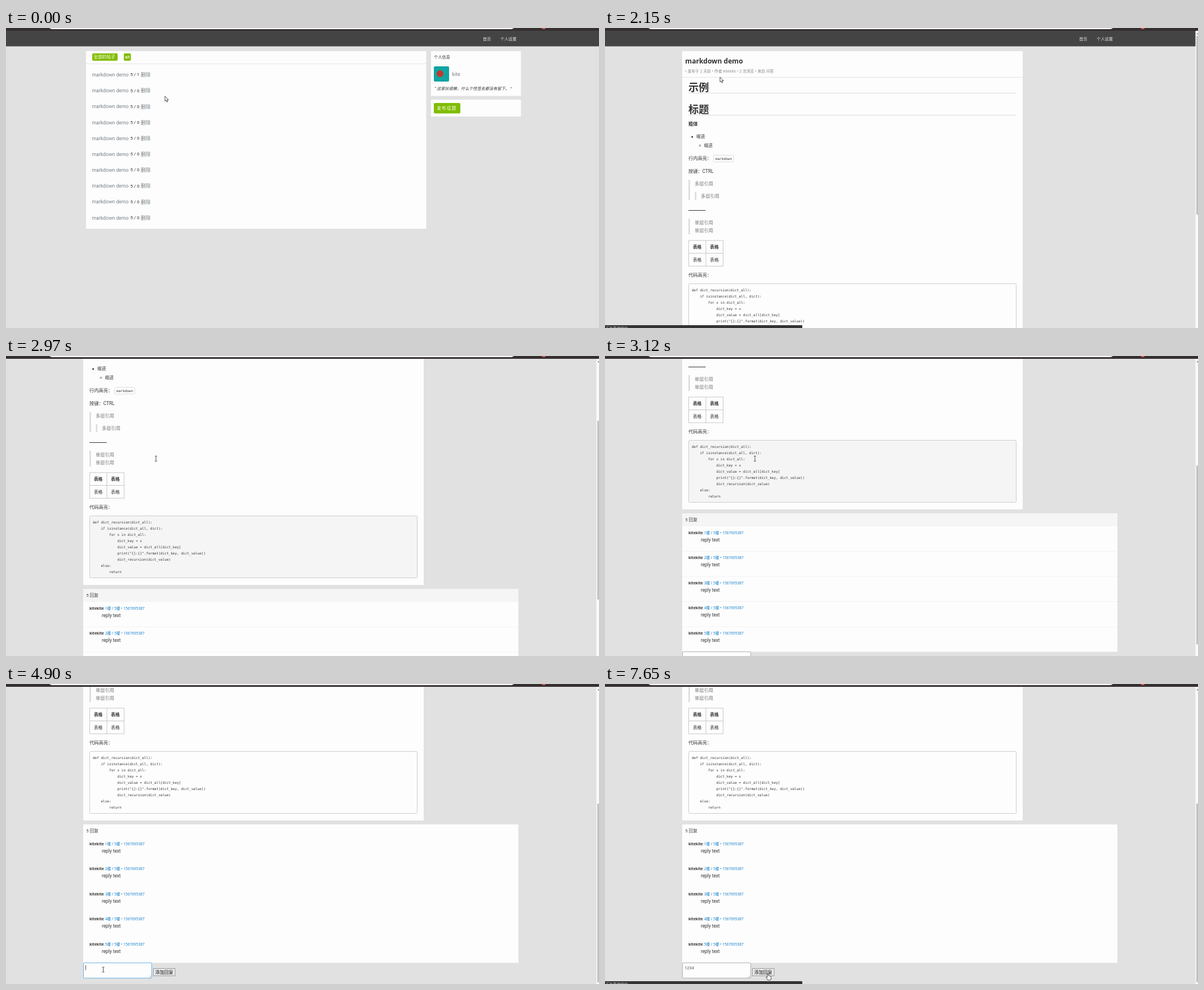
An HTML page that plays this animation: 1052x532 px, repeating every 8000 ms.

```html
<!DOCTYPE html>
<html>
<head>
<meta charset="utf-8">
<style>
html, body { margin: 0; width: 100%; height: 100%; overflow: hidden; background: #e1e1e1; }
svg { display: block; width: 1052px; height: 532px; font-family: Roboto, "Noto Sans CJK SC", "Noto Sans CJK", sans-serif; }
text { white-space: pre; }
.mono { font-family: "DejaVu Sans Mono", monospace; }
.wide { font-family: "Open Sans", "Noto Sans CJK SC", "Noto Sans CJK", sans-serif; }
</style>
</head>
<body>
<svg id="stage" viewBox="0 0 1052 532"></svg>
<script>
const LOOP = 8000;
const MAX_SCROLL = 334;
const PAPER = '#fdfdfd', GREEN = '#80bd01', GREY = '#778087', DARK = '#333', LINE = '#e3e3e3';

const rect = (x, y, w, h, fill, extra = '') =>
  `<rect x="${x}" y="${y}" width="${w}" height="${h}" fill="${fill}" ${extra}/>`;
const frame = (x, y, w, h, stroke, fill = 'none', r = 0) =>
  rect(x, y, w, h, fill, `stroke="${stroke}" rx="${r}"`);
// y is the optical middle of the line
const text = (str, x, y, size, fill = DARK, extra = '') =>
  `<text x="${x}" y="${y + size * .36}" font-size="${size}" fill="${fill}" ${extra}>${str}</text>`;
const group = (id, body) => `<g id="${id}">${body}</g>`;
const repeat = (n, draw) => Array.from({ length: n }, (_, i) => draw(i)).join('');

const BOLD = 'font-weight="700"';
const MEDIUM = 'font-weight="500"';
const WIDE = 'class="wide"';
const MIDDLE = 'text-anchor="middle"';
const MONO = 'class="mono"';

const navBar = shift => rect(0, 5, 1052, 27.5, '#444') +
  text('首页', 846 - shift, 19, 7.15, '#e8e8e8') +
  text('个人设置', 877 - shift, 19, 7.15, '#e8e8e8');

const listRow = i => {
  const y = 83 + 28.17 * i;
  return text('markdown demo', 152.5, y, 8.7, GREY) +
    text(`5 / ${i ? 0 : 1}`, 220.5, y - .5, 8, DARK) +
    text('删除', 239, y, 8.8, GREY);
};

const listPage = navBar(0) +
  rect(142, 41, 603.5, 315, PAPER) + rect(142, 63, 603.5, 1, LINE) +
  rect(153, 45, 45, 13, GREEN, 'rx="2"') + text('全部的帖子', 155.2, 51.5, 7.7, '#fff', MEDIUM) +
  rect(209, 45, 12.5, 13, GREEN, 'rx="2"') + text('all', 211, 51.5, 7.7, '#fff', MEDIUM) +
  repeat(10, listRow) +
  group('underline', rect(152.5, 87, 65.5, .8, GREY)) +
  rect(754, 41, 159.5, 79.5, PAPER) +
  text('个人信息', 759.3, 51.5, 7.15) +
  rect(759, 68, 27, 27, '#11a5a2', 'rx="2"') + '<circle cx="770" cy="81" r="6" fill="#c0392b"/>' +
  text('kite', 791.5, 82, 8.8, GREY) +
  text('“ 这家伙很懒，什么个性签名都没有留下。 ”', 760, 107.5, 7.15, DARK, 'font-style="italic"') +
  rect(754, 127, 159.5, 30, PAPER) +
  rect(759, 133, 47, 18.5, GREEN, 'rx="2"') +
  text('发布话题', 764.3, 142, 7.7, '#fff', `letter-spacing="1.1" ${MEDIUM}`);

const code = `def dict_recursion(dict_all):
    if isinstance(dict_all, dict):
        for x in dict_all:
            dict_key = x
            dict_value = dict_all[dict_key]
            print("{}:{}".format(dict_key, dict_value))
            dict_recursion(dict_value)
    else:
        return`.split('\n');

const heading = (str, y) => text(str, 148, y, 18.2, DARK, BOLD) + rect(148, y + 10, 582, 1, '#ddd');
const quoteBar = (x, y, h) => rect(x, y, 2.8, h, '#ddd');

const article = rect(137, 41, 604, 535, PAPER) +
  text('markdown demo', 142.3, 58.5, 12.1, DARK, `${WIDE} ${BOLD}`) +
  text('• 发布于 2 天前 • 作者 kitekite • 2 次浏览 • 来自 问答', 142.3, 76.3, 6.6, '#838383', `${WIDE} word-spacing=".35"`) +
  rect(137, 87, 604, 1, LINE) +
  heading('示例', 105) + heading('标题', 144) +
  text('粗体', 148, 170, 8.25, DARK, BOLD) +
  '<circle cx="154.6" cy="193" r="1.5" fill="#333"/>' + text('缩进', 162, 192.7, 7.7) +
  '<circle cx="168.4" cy="208.6" r="1.4" fill="none" stroke="#333" stroke-width=".6"/>' + text('缩进', 175.6, 208.5, 7.7) +
  text('行内高亮：', 148, 231, 8.25) + frame(192.5, 225.5, 36, 12, '#ddd', PAPER, 1) +
  text('markdown', 196, 231.8, 6.05, DARK, MONO) +
  text('按键：CTRL', 148, 254.3, 8.25) +
  quoteBar(148, 269, 36) + text('多层引用', 159, 276.3, 8.25, '#777') +
  quoteBar(159.3, 291, 14) + text('多层引用', 170, 298.3, 8.25, '#777') +
  rect(148, 323, 30.5, 1, DARK) +
  quoteBar(148, 338, 28) + text('单层引用', 159, 345.3, 8.25, '#777') + text('单层引用', 159, 358.8, 8.25, '#777') +
  frame(148.5, 376.8, 61, 45.5, '#c8c8c8') + rect(148.5, 399, 61, 1, '#c8c8c8') + rect(178.5, 377, 1, 45.3, '#c8c8c8') +
  [163.6, 194].map(x => text('表格', x, 388.5, 7.7, DARK, `${MIDDLE} ${BOLD}`) + text('表格', x, 411, 7.7, DARK, MIDDLE)).join('') +
  text('代码高亮：', 148, 437.7, 8.25) +
  group('codeShade', rect(148.5, 453.5, 581, 110, '#f5f5f5')) +
  frame(148.5, 453.5, 581, 110, '#ccc', 'none', 2) +
  code.map((line, i) => text(line, 153.9, 464.4 + 11.03 * i, 6.05, DARK, MONO)).join('');

const reply = i => {
  const y = 617.2 + 44.6 * i;
  return text('kitekite', 148, y, 6.6, DARK, `${WIDE} ${BOLD}`) +
    text(`${i + 1}楼 / 5楼 • 1567695387`, 175.7, y, 6.6, '#0a7bc8', WIDE) +
    text('reply text', 170, y + 12.4, 8.25);
};

const replies = rect(137, 583, 772, 245.5, PAPER) +
  group('replyShade', rect(137, 583, 772, 23, '#f5f5f5') + repeat(4, i => rect(137, 650 + 44.6 * i, 772, .8, '#f0f0f0'))) +
  text('5 回复', 142.3, 594.5, 7.7, '#444') + repeat(5, reply);

const form = `<rect id="field" x="137.5" y="828.5" width="121" height="27" rx="1.5" fill="${PAPER}"/>` +
  '<path d="M253.5 855l4-4M256 855l1.5-1.5" stroke="#888" stroke-width=".6"/>' +
  '<text id="typed" x="141" y="839.7" font-size="7.5" fill="#555"></text>' +
  rect(0, 832.5, .8, 9, DARK, 'id="caret"') +
  frame(261.5, 838.5, 38.5, 13, '#999', '#e9e9e9') +
  text('添加回复', 264.8, 845.2, 8, '#111', MEDIUM);

const scrollBar = rect(1047.5, 5, 4.5, 527, '#fafafa') +
  '<path d="M1049.6 11l1.4-2 1.4 2z" fill="#555"/>' + rect(1049, 14, 3, 317, '#c1c1c1', 'id="thumb"');

const browserEdge = rect(0, 0, 1052, 5, '#352f30') +
  '<path d="M77 0H901Q899 2 896 2H82Q79 2 77 0Z" fill="#fff"/>' + rect(951, 0, 6, 2, '#d9534f');

const cursors =
  '<path id="arrow" d="M0 0V8.8L2 7 3.5 10.3 4.9 9.7 3.5 6.5H6.3Z"/>' +
  '<path id="beam" d="M-2-4.5H-.5L0-4 .5-4.5H2M0-4V4M-2 4.5H-.5L0 4 .5 4.5H2" style="fill:none"/>' +
  '<path id="hand" d="M-1 1Q0-.8 1 1V4.5Q2 3.7 2.8 4.9 3.8 4.2 4.4 5.4 5.6 5 5.7 6.5V9L4.7 12H-.2L-3 7.6Q-3.2 6-1.9 6.5L-1 7.5Z"/>';

document.getElementById('stage').innerHTML =
  rect(0, 0, 1052, 532, '#e1e1e1') +
  group('list', listPage) +
  group('topic', group('scroller', navBar(4.7) + article + replies + form) + scrollBar) +
  browserEdge +
  group('status', rect(-2, 527, 10, 8, '#333', 'id="statusBox" rx="1"') +
    '<text id="statusText" x="1" y="535" font-size="6.6" fill="#ccc"></text>') +
  `<g id="pointer" fill="#fff" stroke="#222" stroke-width=".8" stroke-linejoin="round">${cursors}</g>`;

// [time, x, y, shape], each held until the next
const pointerPath = [
  [0, 282, 121, 'arrow'], [650, 267, 122, 'arrow'], [930, 250, 123, 'arrow'], [1070, 236, 116, 'arrow'],
  [1210, 212, 96, 'arrow'], [1350, 201.3, 85.5, 'hand'],
  [2040, 204, 87, 'arrow'], [2580, 240, 145, 'arrow'], [2717, 262, 178, 'arrow'], [2854, 266, 182, 'beam'],
  [3270, 265.3, 181.5, 'arrow'], [3940, 262, 205, 'beam'], [4077, 253, 255, 'arrow'], [4214, 237, 320, 'arrow'],
  [4351, 212, 385, 'arrow'], [4489, 190, 440, 'arrow'], [4626, 174, 492, 'arrow'], [4763, 172.5, 506.5, 'beam'],
  [5170, 178, 509, 'beam'], [5300, 187, 513, 'beam'], [5430, 194, 516, 'beam'],
  [6729, 215, 520, 'beam'], [6862, 246, 521, 'arrow'], [6995, 272, 517, 'hand'], [7128, 289, 513, 'hand']
];
const scrollPath = [[0, 0], [2580, 30], [2717, 95], [2854, 170], [2991, 243], [3120, 304], [3270, MAX_SCROLL]];
const typedPath = [[0, ''], [5960, '1'], [6330, '12'], [6463, '123'], [6596, '1234']];
const WAITING = '正在等待响应…';
const statusPath = [[0, 0, ''], [1630, 73, '/topic/view?page=1'], [2040, 350, WAITING], [2580, 0, ''], [7500, 350, WAITING]];

const held = (path, t) => path.findLast(key => key[0] <= t);
const el = id => document.getElementById(id);
const set = (id, attributes) => Object.entries(attributes).forEach(([k, v]) => el(id).setAttribute(k, v));
const toggle = (id, on) => { el(id).style.display = on ? '' : 'none'; };

function render(t) {
  const onTopic = t >= 2040;
  toggle('list', !onTopic);
  toggle('topic', onTopic);
  toggle('underline', t >= 1350);

  const scroll = held(scrollPath, t)[1];
  set('scroller', { transform: `translate(0 ${-scroll})` });
  set('thumb', { y: 14 + 198 * scroll / MAX_SCROLL });
  const shaded = t >= 2580 && t < 3540;
  toggle('codeShade', shaded);
  toggle('replyShade', shaded);

  const typed = held(typedPath, t)[1];
  const focused = t >= 4763 && t < 7260;
  el('typed').textContent = typed;
  set('field', { stroke: focused ? '#6fb5e6' : '#b0b0b0' });
  set('caret', { x: 141 + 4.22 * typed.length });
  toggle('caret', focused && (t >= 5960 || (t - 4763) % 1060 < 530));

  const [, width, message] = held(statusPath, t);
  toggle('status', width > 0);
  set('statusBox', { width: width + 2 });
  el('statusText').textContent = message;

  const [, x, y, shape] = held(pointerPath, t);
  set('pointer', { transform: `translate(${x} ${y})` });
  ['arrow', 'beam', 'hand'].forEach(id => toggle(id, id === shape));
}

const start = performance.now();
function tick() {
  render((performance.now() - start) % LOOP);
  requestAnimationFrame(tick);
}
tick();
</script>
</body>
</html>
```
